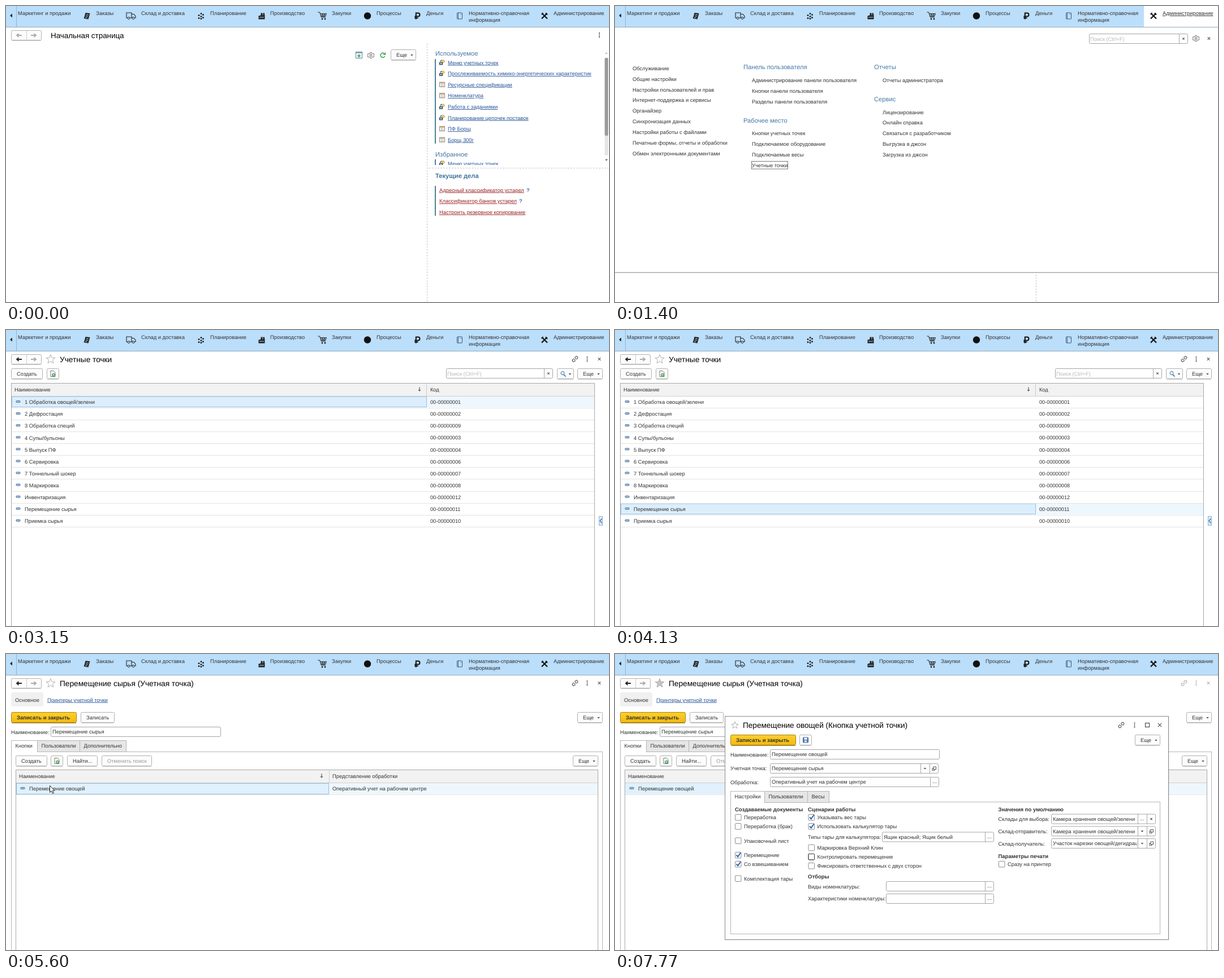
An HTML page that plays this animation: 1066 by 525 pixels, repeating every 8000 ms.

```html
<!DOCTYPE html>
<html lang="ru">
<head>
<meta charset="utf-8">
<style>
html, body { margin: 0; width: 100%; height: 100%; overflow: hidden; background: #fff; }
svg { display: block; }
body > svg { width: 100%; height: 100%; }
text { font-family: "Liberation Sans", Arial, sans-serif; text-rendering: geometricPrecision; white-space: pre; }
</style>
</head>
<body>
<svg id="stage" viewBox="0 0 1066 525"></svg>
<script>
const LOOP = 8000;
const INK = '#333', HEAD = '#4377a8', LINK = '#28559b', RED = '#9c2323';

// Basic shapes; text is centred vertically on y
const t = (x, y, s, size = 9.4, fill = INK, attr = '') =>
  `<text x="${x}" y="${y + size * .35}" font-size="${size}" fill="${fill}" ${attr}>${s}</text>`;
const bold = (x, y, s, size = 9.5, fill = INK) => t(x, y, s, size, fill, 'font-weight="700"');
const link = (x, y, s, fill = LINK) => t(x, y, s, 9.4, fill, 'text-decoration="underline"');
const title = (x, y, s, size = 13.6) => t(x, y, s, size, '#000');
const r = (x, y, w, h, fill = '#fff', stroke = 'none', rx = 0) =>
  `<rect x="${x}" y="${y}" width="${w}" height="${h}" fill="${fill}" stroke="${stroke}" rx="${rx}"/>`;
const p = (d, stroke = INK, w = 1, fill = 'none', attr = '') =>
  `<path d="${d}" stroke="${stroke}" stroke-width="${w}" fill="${fill}" ${attr}/>`;
const c = (x, y, rad, fill, stroke = 'none') =>
  `<circle cx="${x}" cy="${y}" r="${rad}" fill="${fill}" stroke="${stroke}"/>`;
const at = (x, y, s) => `<g transform="translate(${x} ${y})">${s}</g>`;
const g = (id, s) => `<g id="${id}">${s}</g>`;
const rows = (list, f) => list.map(f).join('');

// Small icons
const cross = (x, y, k = 2.3, w = 1.1) => p(`M${x - k} ${y - k}l${2 * k} ${2 * k}m0 ${-2 * k}l${-2 * k} ${2 * k}`, '#555', w);
const caret = (x, y) => p(`M${x - 2.3} ${y - 1}h4.6l-2.3 2.6z`, 'none', 0, '#444');
const dots = (x, y) => [-3.4, 0, 3.4].map(d => c(x, y + d, 1.1, '#444')).join('');
const down = (x, y) => p(`M${x} ${y - 3.5}v6.5m-2 -2l2 2.3 2 -2.3`, '#333');
const gear = (x, y) => at(x, y, c(0, 0, 1.8, 'none', '#555') +
  p('M-1.2 -5h2.4l.5 1.6 1.6 .8 1.6 -.6 1 2 -1.2 1.2 1.2 1.2 -1 2 -1.6 -.6 -1.6 .8 -.5 1.6h-2.4l-.5 -1.6 -1.6 -.8 -1.6 .6 -1 -2 1.2 -1.2 -1.2 -1.2 1 -2 1.6 .6 1.6 -.8z', '#555', .9));
const star = (x, y, k, fill = '#fff', attr = '') => {
  const pts = Array.from({ length: 10 }, (_, i) => {
    const a = i * Math.PI / 5, d = i % 2 ? k * .42 : k;
    return `${(x + d * Math.sin(a)).toFixed(1)},${(y - d * Math.cos(a)).toFixed(1)}`;
  });
  return `<polygon ${attr} points="${pts.join(' ')}" fill="${fill}" stroke="#b0b0b0"/>`;
};
const chain = (x, y) => `<g transform="translate(${x} ${y}) rotate(-45)" fill="none" stroke="#555" stroke-width="1.1">` +
  '<path d="M-1 -2.2h-2.6a2.2 2.2 0 0 0 0 4.4h2.6M1 -2.2h2.6a2.2 2.2 0 0 1 0 4.4h-2.6M-2.5 0h5"/></g>';
const dash = (x, y) => r(x, y - 1.5, 7, 3, '#9dc0e0', '#53779f', .8);
const table = (x, y) => r(x - 4.5, y - 4, 9, 8, '#fff', '#8a8178') + r(x - 4.5, y - 4, 9, 2, '#c9a878') +
  p(`M${x - 1.5} ${y - 2}v6m3 -6v6`, '#8a8178', .8);
const report = (x, y) => p(`M${x - 5} ${y - .5}h6v5h-6z`, 'none', 0, '#34506e') + c(x - 2, y + 2, 1.2, '#fff') +
  p(`M${x - 3} ${y - 1}q0 -3 3 -3`, '#34506e', 1.1) + p(`M${x + 2} ${y - 5}l3 3 -3 3 -3 -3z`, '#a58b2c', .6, '#f2cf55');
const doc = (x, y) => p(`M${x - 4} ${y - 5}h5l3 3v7h-8z`, '#666', .9, '#fff') + c(x + 1, y + 2, 2.8, '#35a048') +
  p(`M${x - .6} ${y + 2}h3.2m-1.6 -1.6v3.2`, '#fff', .9);
const copy = (x, y) => r(x - 1, y - 3, 4.5, 4.5, '#fff', '#555') + p(`M${x - 1} ${y - .5}h-2v4h4v-2`, '#555');
const floppy = (x, y) => r(x - 4.5, y - 4.5, 9, 9, '#5d87b8', '#34608f', 1) + r(x - 2.5, y - 4, 5, 3.2) + r(x - 2, y + 1, 4, 3, '#dbe6f2');

// Controls
const btn = (x, y, w, s = '', tx = 0, fill = INK) =>
  p(`M${x + 1} ${y + 19.5}h${w - 2}`, '#ccc') + r(x + .5, y + .5, w - 1, 18, '#fcfcfc', '#b0b0b0', 2) + (s && t(x + tx, y + 9.7, s, 9.4, fill));
const more = (x, y) => btn(x, y, 45, 'Еще', 10) + caret(x + 37.5, y + 10);
const docBtn = (x, y) => btn(x, y, 22) + doc(x + 11, y + 9.5);
const yellow = (x, y) => p(`M${x + 1} ${y + 19.5}h114`, '#a9893a') +
  r(x + .5, y + .5, 115, 18, 'url(#gold)', '#a5821c', 2) + bold(x + 10, y + 9.7, 'Записать и закрыть');
const search = (x, y, w) => r(x + .5, y + .5, w - 1, 17, '#fff', '#a5a5a5', 2) + t(x + 2, y + 9.3, 'Поиск (Ctrl+F)', 9.4, '#b8b8b8') +
  p(`M${x + w - 15.5} ${y}v18`, '#a5a5a5') + cross(x + w - 8, y + 9, 1.7);
const nav = tone => p('M10 61.5h52', '#ccc') + r(9.5, 43.5, 53, 17, '#fcfcfc', '#b0b0b0', 2) + p('M36.5 44v17', '#ccc') +
  p('M28 52h-9m3.5 -3l-3.5 3 3.5 3', tone, 1.8) + p('M44 52h9m-3.5 -3l3.5 3 -3.5 3', '#aaa', 1.8);
const glyphs = {
  x: (x, y) => cross(x, y, 1.7), v: caret, o: copy,
  d: (x, y) => t(x - 4, y - 1, '...', 9.4)
};
const input = (x, y, w, s, ends = '') => {
  const inner = w - 16 * ends.length;
  return r(x + .5, y + .5, w - 1, 17, '#fff', '#a5a5a5', 2) +
    `<svg x="${x}" y="${y}" width="${inner - 1}" height="18">${t(3, 9.2, s)}</svg>` +
    rows([...ends], (e, i) => p(`M${x + inner + 16 * i + .5} ${y}v18`, '#a5a5a5') + glyphs[e](x + inner + 16 * i + 8, y + 9));
};
const focused = (x, y, s, w) => r(x, y, 301, 21, '#fff', '#9ccbe8') + r(x + 4.5, y + 4, w, 13, '#4560ac') + t(x + 4.5, y + 10.7, s, 9.4, '#fff');
const check = (x, y, s, on) => r(x + .5, y - 5.5, 10.5, 10.5, '#fff', '#8c8c8c', 1) +
  (on ? p(`M${x + 2.5} ${y - .5}l2.8 3 4.7 -7`, '#2462ad', 2) : '') + t(x + 16, y, s);
const tabs = (x, y, list) => rows(list, ([dx, w, s], i) =>
  r(x + dx + .5, y + .5, w, 20, i ? '#e6e6e6' : '#fff', '#b5b5b5') + (i ? '' : r(x + 1, y + 20, w - 1, 1.5)) + t(x + dx + 7.5, y + 9.7, s));

// Section bar
const sections = [[21, 'Маркетинг и продажи'], [159, 'Заказы'], [239, 'Склад и доставка'], [361, 'Планирование'], [467, 'Производство'],
  [576, 'Закупки'], [655, 'Процессы'], [743, 'Деньги'], [818, 'Нормативно-справочная']];
const bar = r(0, 0, 1066, 37, '#bbdefb') + p('M0 37.5h1066', '#93a9bc') + p('M18.5 0v37', '#93b4cd') +
  p('M11 13.5v7l-4 -3.5z', 'none', 0, '#222') + g('tab', r(935, 0, 131, 37)) +
  rows(sections, ([x, s]) => t(x, 12.7, s)) + t(818, 24.3, 'информация') + t(968, 12.7, 'Администрирование', 9.4, INK, 'id="admin"') +
  at(143, 17.5, p('M-2.5 -5.5l8 1 -3 10.5 -8 -1.5 1.3 -3.4z', 'none', 0, '#222') + p('M-1 -2.5l4 .7m-5 2l4 .7m-5 2l3.5 .6', '#bbdefb')) +
  at(221, 17, p('M-8 -5h9v9h-9zM1 -2.5h4l3 3.5v3h-7z', '#222', 1.1) + c(-4, 4.5, 1.9, '#bbdefb', '#222') + c(4, 4.5, 1.9, '#bbdefb', '#222')) +
  at(344, 17.5, rows([[-3, -1], [-3, 4], [1, -4], [1, 1], [1, 5], [4.5, -2], [4.5, 3]], ([x, y]) => c(x, y, 1.5, '#222'))) +
  at(452, 17.5, p('M-5.5 6v-6l4 -1v-4h3v4l4 -1v8zM2.5 -5h2.5v4h-2.5z', 'none', 0, '#222') + p('M-4 2.5h8', '#bbdefb')) +
  at(559, 17, p('M-7.5 -6h3l3 9h7.5M-4 -3.5h11.5l-2 5h-8M-3 -1h9M0 -3.5l1 5m3 -5l-.7 5', '#222') + c(0, 6, 1.4, '#222') + c(5, 6, 1.4, '#222')) +
  c(639, 17.5, 6.2, '#111') +
  at(727, 17.5, p('M-2.2 6v-11h3.7a2.9 2.9 0 0 1 0 6h-6.2M-4.7 3.7h6.2', '#111', 2)) +
  at(802, 17.5, r(-4.5, -5.5, 9, 11, 'none', '#3a5878', 1) + p('M-2.5 -5.5v11M1.5 -3h1.5', '#3a5878')) +
  at(952, 17.5, p('M-4.5 -4.5l9.5 9.5M4.5 -4.5l-9.5 9.5', '#111', 2.2) + p('M-5.5 -2.5l3 -3M2.5 -5.5v3h3', '#111', 1.6));

// Start page
const used = ['Меню учетных точек', 'Прослеживаемость химико-энергетических характеристик', 'Ресурсные спецификации', 'Номенклатура',
  'Работа с заданиями', 'Планирование цепочек поставок', 'ПФ Борщ', 'Борщ 300г'];
const home = nav('#aaa') + title(79, 52, 'Начальная страница', 13.4) + dots(1049, 51.5) +
  r(618.5, 81.5, 11, 11, '#fff', '#64809e') + r(619, 82, 10, 2, '#8fb2d6') + p('M624 85.5v6m-3 -3h6', '#2f9e45', 1.6) +
  gear(645, 87.5) + p('M669 84.5a4 4 0 1 0 .8 4.5M670.5 82.5v3.5h-3.5', '#2f9e45', 1.5) + more(680, 77) +
  p('M744.5 66v459M748 287.5h317', '#c8c8c8', 1, 'none', 'stroke-dasharray="3 2"') +
  t(759, 84, 'Используемое', 11.3, HEAD) + p('M759 94v150', '#4a8294', 2) +
  rows(used, (s, i) => ([2, 3, 6, 7].includes(i) ? table : report)(771, 100 + 19.6 * i) + link(781, 100.3 + 19.6 * i, s)) +
  t(759, 263, 'Избранное', 11.3, HEAD) +
  `<svg x="750" y="272" width="300" height="10">${p('M9 0v10', '#4a8294', 2) + report(21, 7) + link(31, 7.3, used[0])}</svg>` +
  r(1058.5, 92, 6, 173, '#e4e4e4', 'none', 2) + r(1058.5, 92, 6, 138, '#9a9a9a', 'none', 2) +
  p('M1059 85h5l-2.5 -3z', 'none', 0, '#bbb') + caret(1061.5, 273) +
  bold(759, 301, 'Текущие дела', 11.2, '#3f749c') + p('M759 319v53', '#4a8294', 2) +
  rows(['Адресный классификатор устарел', 'Классификатор банков устарел', 'Настроить резервное копирование'],
    (s, i) => link(766, 326.3 + 19.6 * i, s, RED)) + bold(920, 326.3, '?', 9.4, '#376fa5') + bold(907, 346, '?', 9.4, '#376fa5');

// Administration menu
const admin = ['Обслуживание', 'Общие настройки', 'Настройки пользователей и прав', 'Интернет-поддержка и сервисы', 'Органайзер', 'Синхронизация данных',
  'Настройки работы с файлами', 'Печатные формы, отчеты и обработки', 'Обмен электронными документами'];
const group = (x, y, head, list) => t(x, y, head, 11.2, HEAD) + rows(list, (s, i) => t(x + 15, y + 23 + 18.9 * i, s));
const menu = r(0, 38, 1066, 434) + p('M0 472.5h1066', '#999') + p('M0 473.7h1066', '#e4e4e4') +
  search(838, 49, 175) + gear(1027, 57.5) + cross(1050, 57.5) +
  rows(admin, (s, i) => t(31, 110.5 + 18.9 * i, s)) +
  group(227, 108.5, 'Панель пользователя', ['Администрирование панели пользователя', 'Кнопки панели пользователя', 'Разделы панели пользователя']) +
  group(227, 203, 'Рабочее место', ['Кнопки учетных точек', 'Подключаемое оборудование', 'Подключаемые весы']) +
  t(242, 282.8, 'Учетные точки', 9.4, INK, 'id="points"') + r(241.5, 275.5, 64, 13.5, 'none', '#777') +
  group(458, 108.5, 'Отчеты', ['Отчеты администратора']) +
  group(458, 165.3, 'Сервис', ['Лицензирование', 'Онлайн справка', 'Связаться с разработчиком', 'Выгрузка в джсон', 'Загрузка из джсон']);

// List of points
const names = ['1 Обработка овощей/зелени', '2 Дефростация', '3 Обработка специй', '4 Супы/бульоны', '5 Выпуск ПФ', '6 Сервировка',
  '7 Тоннельный шокер', '8 Маркировка', 'Инвентаризация', 'Перемещение сырья', 'Приемка сырья'];
const codes = [1, 2, 9, 3, 4, 6, 7, 8, 12, 11, 10];
const pageHead = s => nav('#222') + star(79, 52, 8.5, '#fff', 'class="star"') + title(95, 52, s, 13.7) +
  `<g class="tools">${chain(1006, 51.5) + dots(1027.5, 51.5) + cross(1049, 51.5)}</g>`;
const list = r(0, 38, 1066, 487) + pageHead('Учетные точки') + btn(9, 68, 56, 'Создать', 10) + docBtn(72, 68) +
  search(778, 68, 189) + btn(974, 68, 30) + c(984, 76.5, 3, 'none', '#2d6ca8') + p('M986 79l3.5 3.5', '#2d6ca8', 1.6) + caret(997, 78) + more(1010, 68) +
  r(9.5, 94.5, 1031, 440, '#fff', '#a8a8a8') + r(10, 95, 1030, 22, '#f2f2f2') + p('M10 117.5h1030', '#d0d0d0') +
  g('pick', r(744, 118, 296, 19, '#eef7fe') + r(10.5, 118, 733, 18.5, '#dceefc', '#94bfe0')) +
  p('M743.5 95v22', '#ccc') + t(15, 105.5, 'Наименование', 9.2) + down(731, 105) + t(750, 105.5, 'Код', 9.2) +
  rows(names, (s, i) => dash(18, 127 + 21.08 * i) + t(33, 128 + 21.08 * i, s) +
    t(750, 128 + 21.08 * i, '00-' + String(codes[i]).padStart(8, '0'), 9.2) + p(`M10 ${Math.round(138 + 21.08 * i) + .5}h1030`, '#e3e3e3')) +
  r(1048.5, 330.5, 6, 16, '#d9ebf9', '#8eb3d1') + p('M1053.5 334.5l-3.5 4 3.5 4', '#3b6a94', 1.2);

// Point form
const form = r(0, 38, 1066, 487) + pageHead('Перемещение сырья (Учетная точка)') +
  r(9, 68, 57, 25, '#f0f0f0', 'none', 3) + t(16, 81.3, 'Основное') + link(73, 81.3, 'Принтеры учетной точки') +
  yellow(9, 103) + btn(132, 103, 60, 'Записать', 10) + more(1010, 103) + t(9, 138.3, 'Наименование:') +
  g('nameOff', input(79, 129, 301, 'Перемещение сырья')) + g('nameOn', focused(78, 127.5, 'Перемещение сырья', 92.5)) +
  r(9.5, 173.5, 1045, 360, '#fff', '#b5b5b5') + tabs(9, 153, [[0, 46, 'Кнопки'], [46, 75, 'Пользователи'], [121, 82, 'Дополнительно']]) +
  btn(17, 180, 56, 'Создать', 10) + docBtn(79, 180) + btn(108, 180, 54, 'Найти...', 10) + btn(169, 180, 89, 'Отменить поиск', 10, '#999') + more(1002, 180) +
  r(17.5, 205.5, 1029, 330, '#fff', '#a8a8a8') + r(18, 206, 1028, 22, '#f2f2f2') + p('M18 228.5h1028M571.5 206v22', '#d0d0d0') +
  t(23, 216.5, 'Наименование', 9.2) + down(558, 216) + t(577, 216.5, 'Представление обработки') +
  r(18, 229, 553, 19.5, '#e0f0fc') + r(571, 229, 475, 19.5, '#eef7fe') + g('rowFocus', r(18.5, 229.5, 552, 19, 'none', '#94bfe0')) +
  p('M18 249.5h1028', '#e3e3e3') + dash(26, 238) + t(41, 239, 'Перемещение овощей') + t(577, 239, 'Оперативный учет на рабочем центре');

// Button dialog
const dialog = r(194, 111, 786, 397, 'rgba(0,0,0,.07)') + r(194.5, 110.5, 784, 396, '#fff', '#8a8a8a') +
  star(212, 126.5, 6.5) + title(226, 126.5, 'Перемещение овощей (Кнопка учетной точки)') +
  chain(895, 126) + dots(918.5, 126) + r(937.5, 122.5, 7, 7, 'none', '#333') + cross(963, 126, 3.2, 1.2) +
  yellow(204, 143) + btn(326, 143, 22) + floppy(337, 152.5) + more(919, 143) +
  t(204, 178.3, 'Наименование:') + t(204, 202.8, 'Учетная точка:') + t(204, 227.5, 'Обработка:') +
  g('capOff', input(274, 169, 300, 'Перемещение овощей')) + g('capOn', focused(273, 167.5, 'Перемещение овощей', 100)) +
  input(274, 194, 298, 'Перемещение сырья', 'vo') + input(274, 218, 299, 'Оперативный учет на рабочем центре', 'd') +
  r(204.5, 262.5, 759, 234, '#fff', '#b5b5b5') + tabs(204, 243, [[0, 60, 'Настройки'], [60, 76, 'Пользователи'], [136, 38, 'Весы']]) +
  bold(212, 275.3, 'Создаваемые документы') +
  rows([[290, 'Переработка'], [306, 'Переработка (брак)'], [331.5, 'Упаковочный лист'], [357, 'Перемещение', 1], [373, 'Со взвешиванием', 1], [398.5, 'Комплектация тары']],
    ([y, s, on]) => check(212, y, s, on)) +
  bold(341, 275.3, 'Сценарии работы') +
  rows([[290, 'Указывать вес тары', 1], [306, 'Использовать калькулятор тары', 1], [343.8, 'Маркировка Верхний Клин'], [360, 'Контролировать перемещение'], [376, 'Фиксировать ответственных с двух сторон']],
    ([y, s, on]) => check(341.5, y, s, on)) + g('hover', r(342, 354.5, 10.5, 10.5, 'none', '#333', 1)) +
  t(341, 325, 'Типы тары для калькулятора:') + input(472, 315.5, 198, 'Ящик красный; Ящик белый', 'd') +
  bold(341, 394.7, 'Отборы') + t(341, 412.3, 'Виды номенклатуры:') + input(479, 403, 191, '', 'd') +
  t(341, 434.2, 'Характеристики номенклатуры:') + input(479, 425, 191, '', 'd') +
  bold(677.5, 275.3, 'Значения по умолчанию') +
  rows([['Склады для выбора:', 'Камера хранения овощей/зелени', 'dx'], ['Склад-отправитель:', 'Камера хранения овощей/зелени', 'vo'],
    ['Склад-получатель:', 'Участок нарезки овощей/дегидрации', 'vo']],
    ([s, v, ends], i) => t(677.5, 293 + 21.7 * i, s) + input(771, 283.6 + 21.7 * i, 185, v, ends)) +
  bold(677.5, 358.3, 'Параметры печати') + check(678, 373, 'Сразу на принтер');

const pointer = p('M.5 .5v12l2.8 -2.6 2 4.4 2 -.9 -2 -4.3h3.8z', '#222', 1, '#fff');
const defs = '<linearGradient id="gold" x2="0" y2="1"><stop stop-color="#ffd02c"/><stop offset="1" stop-color="#f2b90c"/></linearGradient>';

const stage = document.getElementById('stage');
stage.innerHTML = defs + r(0, 0, 1066, 525) + bar + g('home', home) + g('menu', menu) + g('list', list) + g('form', form) + g('dialog', dialog) + g('pointer', pointer);

const el = id => document.getElementById(id);
const show = (id, on) => el(id).setAttribute('display', on ? 'inline' : 'none');
const underline = (id, on) => el(id).setAttribute('text-decoration', on ? 'underline' : 'none');

// Pointer shows only while the program is busy: [from, to, x, y]
const clicks = [[2800, 2870, 254, 281], [2870, 3080, 262, 282], [4270, 4900, 62, 321], [5600, 5670, 77, 233], [5670, 5740, 80, 236], [5740, 5810, 83, 238], [5810, 6160, 85, 240]];

function draw(now) {
  const ms = now % LOOP, during = (a, b) => ms >= a && ms < b;
  underline('admin', during(980, 1960));
  underline('points', during(2590, 3080));
  show('home', ms < 3080);
  show('tab', during(1400, 3080));
  show('menu', during(1400, 3080));
  show('list', during(3080, 4340));
  el('pick').setAttribute('transform', `translate(0 ${ms < 4130 ? 0 : 190})`);
  show('form', ms >= 4340);
  show('nameOn', ms < 5460);
  show('nameOff', ms >= 5460);
  show('rowFocus', during(5460, 5950));
  const modal = ms >= 5950;
  show('dialog', modal);
  document.querySelectorAll('.star').forEach(e => e.setAttribute('fill', modal ? '#c4c4c4' : '#fff'));
  document.querySelectorAll('.tools').forEach(e => e.setAttribute('opacity', modal ? .45 : 1));
  show('hover', ms >= 7420);
  show('capOn', ms < 7770);
  show('capOff', ms >= 7770);
  const click = clicks.find(k => during(k[0], k[1]));
  show('pointer', click);
  if (click) el('pointer').setAttribute('transform', `translate(${click[2]} ${click[3]})`);
}

const start = performance.now();
function tick() {
  draw(performance.now() - start);
  requestAnimationFrame(tick);
}
tick();
</script>
</body>
</html>
```
